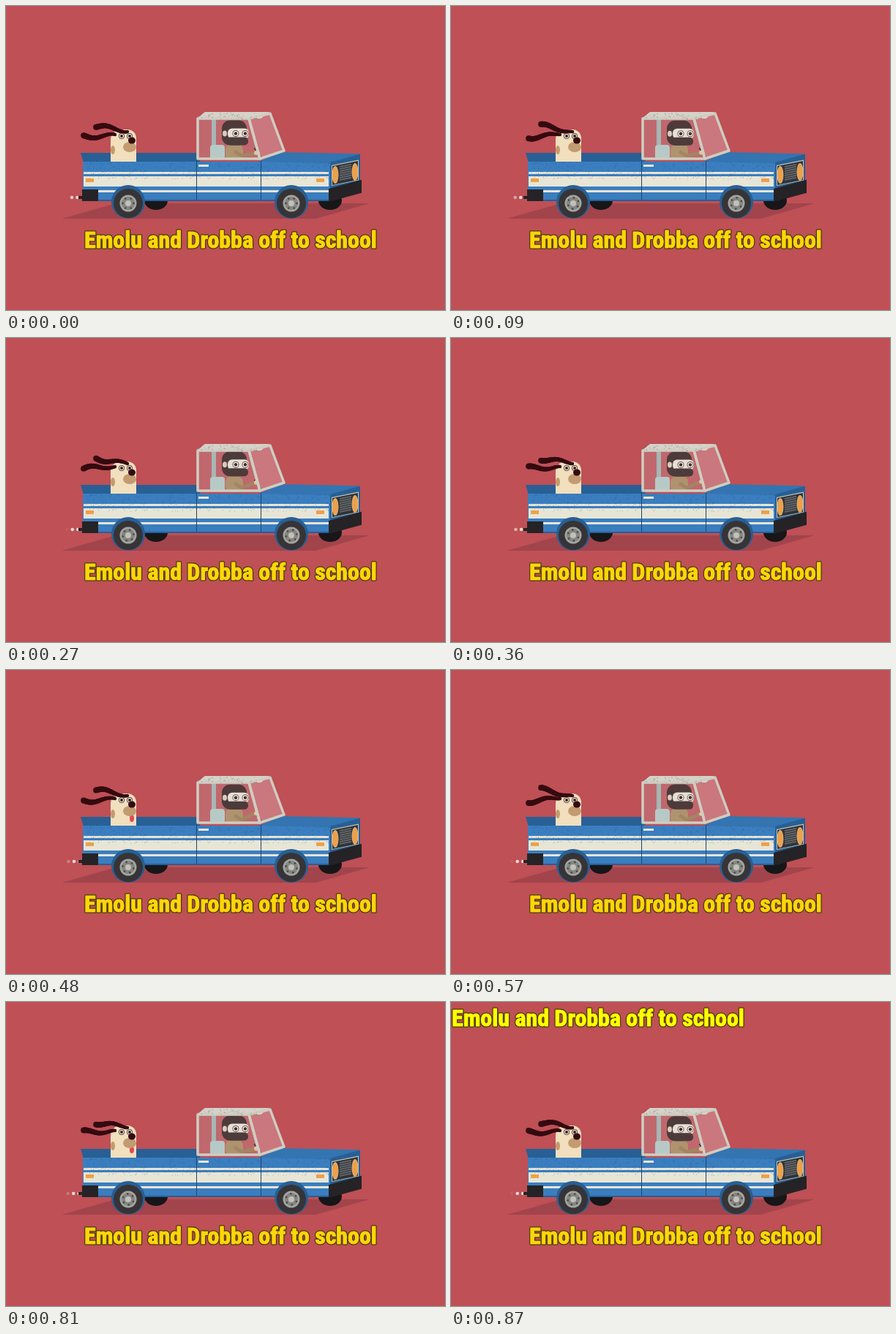
An HTML page with a canvas that plays this animation: 600x416 px, repeating every 0.9 s.

```html
<!DOCTYPE html>
<html lang="en">
<head>
<meta charset="utf-8">
<title>Off to school</title>
<style>
html, body { margin: 0; width: 100%; height: 100%; overflow: hidden; background: #be5056; }
canvas { display: block; }
</style>
</head>
<body>
<canvas id="stage" width="600" height="416"></canvas>
<script>
const ctx = document.getElementById('stage').getContext('2d');
const LOOP = 900, STEP = 30, TAU = Math.PI * 2;
const RED = '#be5056', BLUE = '#3a7ec0', NAVY = '#285f94', CREAM = '#e7e5d6';
const BLACK = '#252326', HAIR = '#3e2c2b', EAR = '#350b10', AMBER = '#eda04a';
const CAPTION = 'Emolu and Drobba off to school';
const FONTS = "Impact, 'Roboto Condensed', 'Open Sans Condensed', 'Noto Sans', sans-serif";
const wave = turns => Math.sin(TAU * turns);

function fill(color, trace) {
  ctx.fillStyle = color;
  ctx.beginPath();
  trace();
  ctx.fill();
}
const oval = (color, x, y, rx, ry = rx) =>
  fill(color, () => ctx.ellipse(x, y, rx, ry, 0, 0, TAU));
const round = (color, x, y, w, h, r = 0) =>
  fill(color, () => ctx.roundRect(x, y, w, h, r));
const poly = (color, points) =>
  fill(color, () => { for (const p of points) ctx.lineTo(...p); ctx.closePath(); });

// Parallelogram: slope tilts the long edges, lean tilts the sides
function panel(color, x, y, w, h, slope = 0, lean = 0) {
  const drop = w * slope, shift = h * lean;
  poly(color, [[x, y], [x + w, y + drop], [x + w + shift, y + h + drop], [x + shift, y + h]]);
}

function stroke(color, width, ...points) {
  ctx.strokeStyle = color;
  ctx.lineWidth = width;
  ctx.lineCap = ctx.lineJoin = 'round';
  ctx.beginPath();
  for (const p of points) ctx.lineTo(...p);
  ctx.stroke();
}

// Seeded wear marks on the paint
function grain(count, x, y, w, h) {
  let seed = 73;
  const random = () => (seed = seed * 16807 % 2147483647) / 2147483647;
  for (let i = 0; i < count; i++) round('rgba(40,60,80,.3)', x + random() * w, y + random() * h, 1, 1);
}

function eye(x, y, r) {
  oval('#5f4640', x, y, r);
  oval('#fff7e8', x, y, r - 1);
  oval('#301f22', x, y, r / 2);
}

function wheel(x, t) {
  const y = 270;
  oval(NAVY, x, y - 2, 23);
  oval('#363436', x, y, 20);
  oval('#a4a49f', x, y, 11.5);
  oval('#858682', x, y, 9);
  for (let i = 0; i < 6; i++) {
    const a = TAU * (i / 6 + t / LOOP);
    oval('#454545', x + 7.5 * Math.cos(a), y + 7.5 * Math.sin(a), 1.3);
  }
  oval('#c1c0b9', x, y, 4);
}

function puffs(t) {
  for (let age = (t + 120) % 300; age < 700; age += 300) {
    ctx.globalAlpha = Math.min(1, (720 - age) / 330);
    oval('#e8d8cc', 100.5 - age / 40, 262, 2.3);
  }
  ctx.globalAlpha = 1;
}

function ear(x, y, rise, t, phase) {
  for (let u = 0; u <= 1; u += 0.025) {
    const sway = 3.5 * Math.sqrt(u) * wave(u * 0.9 - t / 450 + phase);
    oval(EAR, x - 44 * u, y - rise * u + sway, 2.2 + 1.8 * u);
  }
}

function dog(t) {
  const tongue = wave(t / 300 - 0.36);
  round('#f1dfbd', 143, 169, 35, 60, [14, 12, 0, 0]);
  oval('#c39b6c', 146, 197, 3, 6);
  if (tongue > 0) oval('#e04a55', 172, 199 + 4 * tongue, 3, 2 + 3 * tongue);
  oval('#c29b70', 169, 193, 9, 7);
  ear(166, 172, 8, t, 0.2);
  ear(149, 176, -3, t, 0.71);
  eye(158, 178, 4);
  eye(169, 178, 4);
  oval(EAR, 172, 184, 5, 4.5);
}

function driver(t) {
  const reach = 2.5 - 2.5 * Math.cos(TAU * t / LOOP);
  const bob = 0.8 * wave(t / 450 + 0.1);
  round('#a98b64', 300, 189, 24, 22, 8);
  round(HAIR, 295, 156 + bob, 34, 34, 11);
  round('#e4ddd2', 303, 167 + bob, 29, 14, 6);
  oval('#d9c7b6', 299, 174 + bob, 3, 4);
  round(HAIR, 302, 179 + bob, 29, 11, 5);
  eye(314, 174 + bob, 4.5);
  eye(327, 174 + bob, 4.5);
  stroke(BLACK, 2, [340, 195], [348, 206]);
  stroke('#9b7c55', 5, [314, 200], [322, 205], [339, 202 - reach]);
  oval('#e4bd98', 342, 201 - reach, 3);
}

function glass(tint, ...points) {
  poly(tint, points);
  stroke('#cfcdc1', 3.5, ...points, points[0]);
}

function cab(t) {
  const [back, roof, nose] = [[262, 154], [361, 147], [380, 198]];
  const [hinge, sill, corner] = [[332, 154], [347, 209], [262, 209]];
  poly('#bb5c62', [back, roof, nose, sill, corner]);
  panel('#9fb1af', 281, 155, 6, 54);
  round('#b2c5c2', 279, 190, 20, 20, 4);
  driver(t);
  panel('#d5d3c8', 272, 145, 88, 9, 0, -1.3);
  glass('rgba(255,255,255,.07)', back, hinge, sill, corner);
  glass('rgba(255,215,220,.22)', hinge, roof, nose, sill);
  grain(60, 264, 146, 78, 8);
}

function front() {
  panel(NAVY, 443, 214, 41, 37, -0.28);
  panel('#c8c6b9', 445, 218, 37, 28, -0.2);
  panel('#303338', 446, 219, 35, 26, -0.2);
  for (let y = 219; y < 240; y += 3) panel('#626566', 456, y, 16, 2, -0.2);
  for (const [x, y] of [[450, 231], [477, 227]]) {
    oval('#d6b17a', x, y, 4.5, 12);
    oval(AMBER, x, y, 3.5, 10.5);
  }
  panel(BLACK, 441, 250, 45, 18, -0.27);
}

function truck(t) {
  panel('#a2444c', 150, 270, 347, 21, 0, -3.5);
  for (const x of [205, 443]) oval('#171619', x, 266, 16, 13);
  panel(NAVY, 102, 201, 160, 15, 0, 0.3);
  dog(t);
  panel(BLUE, 105, 213, 338, 54);
  panel('#3474b0', 376, 200, 107, 13, 0.02, -2.4);
  for (const [y, h] of [[227, 3], [233, 14], [252, 3]]) panel(CREAM, 106, y, 335, h);
  grain(420, 106, 213, 335, 24);
  for (const x of [260, 348]) panel('#1f4568', x, 212, 1, 55);
  panel(CREAM, 263, 217, 14, 3);
  for (const x of [109, 424]) panel(AMBER, x, 236, 11, 5);
  panel(NAVY, 105, 265, 336, 2);
  front();
  cab(t);
  puffs(t);
  panel(BLACK, 99, 260, 8, 4);
  panel(BLACK, 104, 251, 22, 16);
  wheel(167, t);
  wheel(390, t);
}

// Choose the type size whose natural width suits the caption
ctx.font = `900 36px ${FONTS}`;
const size = Math.min(36, 36 * 400 / ctx.measureText(CAPTION).width);

function caption(color, x, y) {
  ctx.font = `900 ${size}px ${FONTS}`;
  ctx.lineJoin = 'round';
  for (const [ink, width] of [['#4a3a10', 3.5], [color, 1]]) {
    ctx.strokeStyle = ink;
    ctx.lineWidth = width;
    ctx.strokeText(CAPTION, x, y);
  }
  ctx.fillStyle = color;
  ctx.fillText(CAPTION, x, y);
}

function draw() {
  const t = Math.floor(performance.now() % LOOP / STEP) * STEP;
  panel(RED, 0, 0, 600, 416);
  truck(t);
  caption('#ffd50a', 107, 331);
  if (t === LOOP - STEP) caption('#ffff00', 1, 33);
  requestAnimationFrame(draw);
}
draw();
</script>
</body>
</html>
```
